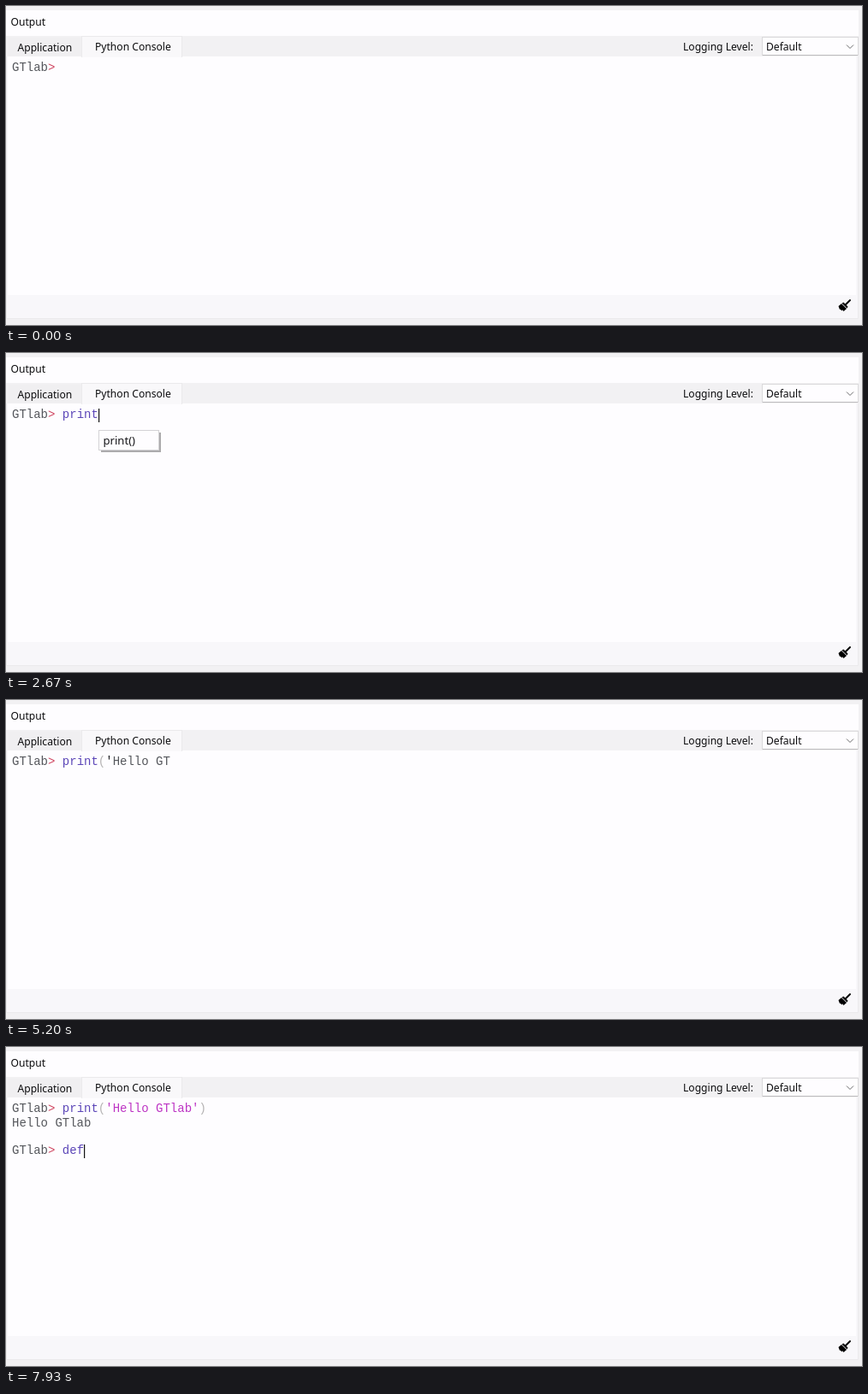
These frames come from a looping animation (1000 by 373 pixels, 8000 ms). An HTML page:

```html
<!DOCTYPE html>
<html lang="en">
<head>
<meta charset="utf-8">
<title>Python console</title>
<style>
  html, body { margin: 0; width: 100%; height: 100%; overflow: hidden; background: #f2f1f3; }
  svg { display: block; width: 1000px; height: 373px; }
  text { white-space: pre; }
  .ui { font: 12.1px "Noto Sans", "Open Sans", sans-serif; fill: #0c0c0e; }
  .item { font: 13.1px "Noto Sans", "Open Sans", sans-serif; fill: #17171a; }
  .code { font: 14px "Liberation Mono", "Courier New", monospace; fill: #55575c; }
  .mark { fill: #cf4560; }
  .key { fill: #5c46b8; }
  .paren { fill: #b5b3b4; }
  .quote { fill: #222226; }
  .string { fill: #bd35c4; }
</style>
</head>
<body>
<svg viewBox="0 0 1000 373">
  <rect width="1000" height="373" fill="#f2f1f3"/>
  <rect y="5" width="996" height="30" fill="#fefdff"/>
  <rect y="59" width="996" height="306" fill="#f8f7fa"/>
  <rect x="2" y="59" width="991" height="279" fill="#fefdff"/>
  <path d="M.5 59V365.5H995.5V59" fill="none" stroke="#ebeaec"/>
  <rect x="3" y="37" width="85" height="22" fill="#f0eff1"/>
  <rect x="88.5" y="35.5" width="117" height="24" fill="#f9f8fa" stroke="#ebeaec"/>
  <rect x="89" y="58" width="116" height="2" fill="#f9f8fa"/>
  <rect x="883.5" y="36.5" width="112" height="21" fill="#fefdff" stroke="#dad9db"/>
  <path d="M884 57.5H995" stroke="#bcbbbd"/>
  <path d="M982 45.5l4 4 4-4" fill="none" stroke="#6a6a6c"/>
  <g class="ui">
    <text x="5.5" y="23">Output</text>
    <text x="13.5" y="52.5">Application</text>
    <text x="104" y="52">Python Console</text>
    <text x="791" y="52">Logging Level:</text>
    <text x="888" y="52">Default</text>
  </g>
  <path d="M986 344l-5 5" stroke="#000" stroke-width="2" stroke-linecap="round"/>
  <path d="M978.5 346.5l5 5-1 2-6-6zM976 348l6 6-3.5 3-1.5-2-.5 1.5-2-2-.5.5-1.5-4z"/>
  <g id="lines" class="code"></g>
  <g id="popup"></g>
  <rect id="caret" width="1.2" height="16" fill="#111"/>
</svg>
<script>
const LOOP = 8000, LEFT = 7, CHAR = 8.4, PROMPT = 7, ROW = 18.7, TOP = 90;

const MENUS = {
  edge: { width: 113, items: ["", ""], bare: true },
  pr: { width: 113, items: ["print()", "property()"] },
  print: { width: 71, items: ["print()"] },
  lab: { width: 70, items: ["GTlab"] },
  gt: {
    width: 183, bar: true,
    items: ["GtClasses", "gtDebug()", "gtError()", "gtFatal()", "gtInfo()", "GTlab", "GtpyExtendedWrapper()"]
  }
};

// time, typed text, caret shown, menu, menu column (defaults to the end of the text)
const H = "print('Hello";
const DONE = H + " GTlab')\n";
const STEPS = [
  [0, "", 0],
  [600, "", 1],
  [800, "", 0],
  [1670, "", 0, "edge", 1],
  [1800, "p", 1, "pr"],
  [1870, "pr", 1, "pr"],
  [2130, "pr", 1],
  [2270, "pri", 1],
  [2330, "pri", 1, "print"],
  [2400, "prin", 1, "print"],
  [2670, "print", 1, "print"],
  [2800, "print(", 1],
  [3200, "print('", 1],
  [3470, "print('H", 1],
  [3670, "print('He", 1],
  [3800, "print('He", 0],
  [4000, "print('Hel", 1],
  [4130, "print('Hell", 1],
  [4270, H, 1],
  [4470, H + " ", 1],
  [4670, H + " ", 0],
  [4930, H + " G", 0, "gt"],
  [5070, H + " GT", 0, "gt"],
  [5200, H + " GT", 0],
  [5530, H + " GTl", 0, "lab"],
  [5670, H + " GTl", 0, "lab", 17],
  [5870, H + " GTla", 0, "lab"],
  [6130, H + " GTlab", 0, "lab"],
  [6330, H + " GTlab'", 1],
  [6670, H + " GTlab')", 1],
  [6930, DONE, 1],
  [7130, DONE + "d", 1],
  [7730, DONE + "de", 1],
  [7930, DONE + "def", 1]
];

const lines = document.getElementById("lines");
const popup = document.getElementById("popup");
const caret = document.getElementById("caret");

const span = (cls, s) => `<tspan class="${cls}">${s}</tspan>`;
const row = (n, s) => `<text x="${LEFT}" y="${76.2 + n * 16.4}">${s}</text>`;
const rect = (x, y, w, h, fill, more = "") =>
  `<rect x="${x}" y="${y}" width="${w}" height="${h}" fill="${fill}" ${more}/>`;
const column = n => LEFT + (PROMPT + n) * CHAR;

function highlight(s) {
  return s.replace(/^(print|def)|\(|'[^']*'|'|\)/g, m => {
    if (m === "(" || m === ")") return span("paren", m);
    if (m === "'") return span("quote", m);
    return span(m[0] === "'" ? "string" : "key", m);
  });
}

const promptRow = (n, s) => row(n, "GTlab" + span("mark", "&gt;") + " " + highlight(s));

function drawMenu(name, col) {
  if (!name) return "";
  const { width, items, bar, bare } = MENUS[name];
  const x = Math.ceil(column(col)), h = items.length * ROW + 5.3;
  const shadow = `<path d="M${x + width + 1} ${TOP + 3}V${TOP + h + 1}H${x + 3}" fill="none" stroke="#acabad" stroke-width="2"/>`;
  if (bare) return shadow;
  let out = shadow + rect(x + .5, TOP + .5, width - 1, h - 1, "#fefdff", 'stroke="#d3d2d5"');
  if (bar) {
    out += rect(x + width - 21, TOP + 2, 19, h - 4, "#efeef0");
    out += rect(x + width - 13, TOP + 22, 3, 81, "#7c7b7d", 'rx="1.5"');
  }
  items.forEach((s, i) => {
    out += `<text class="item" x="${x + 5.5}" y="${106.6 + i * ROW}">${s}</text>`;
  });
  return out;
}

let shown = -1;

function draw(now) {
  const t = now % LOOP;
  const i = STEPS.findLastIndex(s => s[0] <= t);
  if (i !== shown) {
    shown = i;
    const [, text, blink, menu, col] = STEPS[i];
    const [first, second] = text.split("\n");
    const entered = second !== undefined;
    const active = entered ? second : first;
    lines.innerHTML = promptRow(0, first) +
      (entered ? row(1, "Hello GTlab") + promptRow(3, second) : "");
    popup.innerHTML = drawMenu(menu, col ?? active.length);
    caret.setAttribute("x", Math.round(column(active.length)));
    caret.setAttribute("y", entered ? 114 : 65);
    caret.style.display = blink ? "" : "none";
  }
  requestAnimationFrame(() => draw(performance.now()));
}
draw(0);
</script>
</body>
</html>
```
